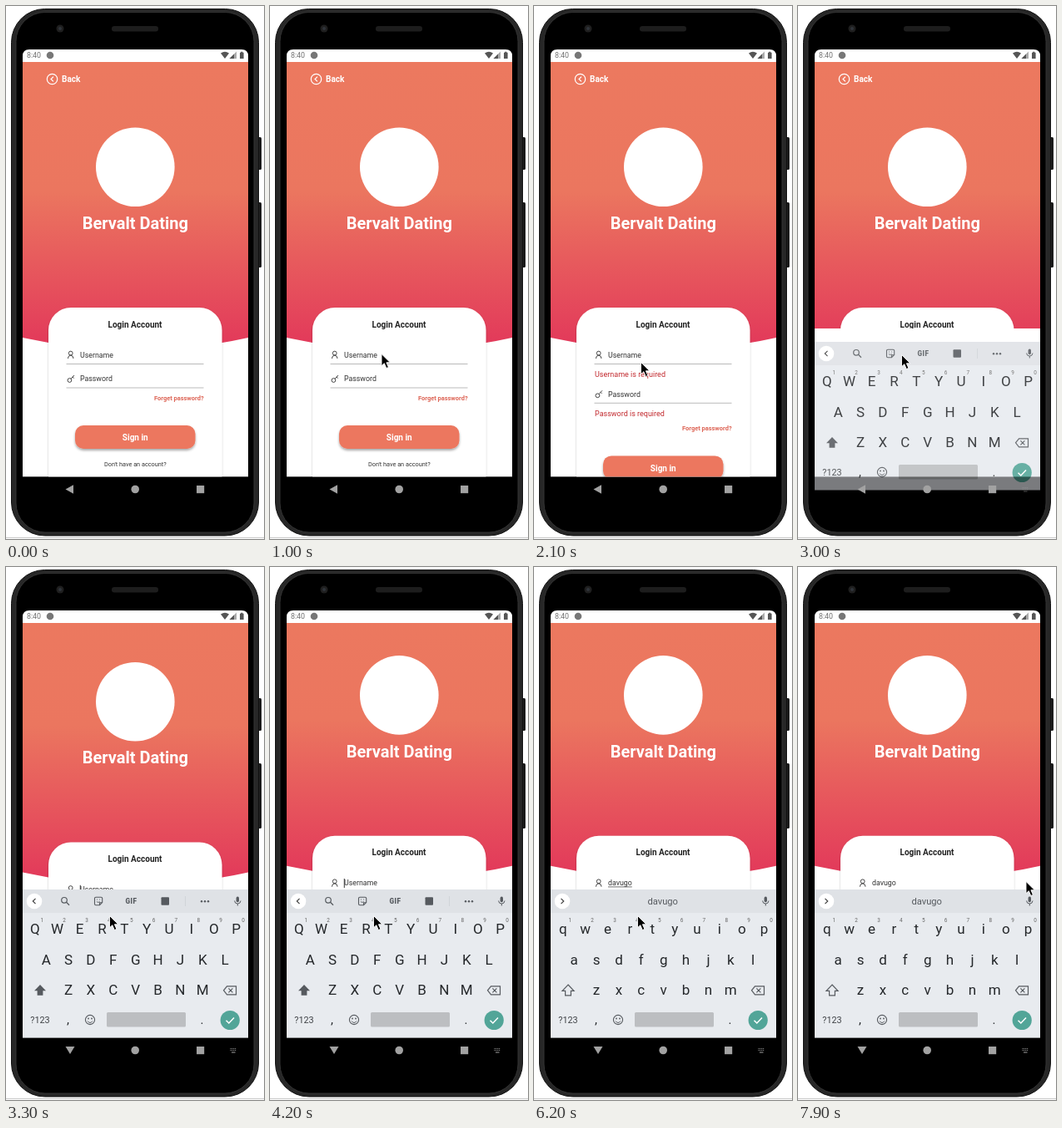
Write an HTML page that moves like this. It is 310 by 638 pixels and loops after 8000 ms.

```html
<!DOCTYPE html>
<html lang="en">
<head>
<meta charset="utf-8">
<title>Login form</title>
<style>
html, body { margin: 0; width: 100%; height: 100%; overflow: hidden; background: #fff; }
svg { display: block; width: 310px; height: 638px; font-family: Roboto, "Noto Sans", sans-serif; user-select: none; }
</style>
</head>
<body>
<svg id="stage" viewBox="0 0 310 638" xmlns="http://www.w3.org/2000/svg"></svg>
<script>
const LOOP = 8000, STEP = 100;
const BRAND = "Bervalt Dating", NAME = "davugo";
const TYPE_START = 4300, TYPE_GAP = 260, COMMIT = 7500;
const CORAL = "#ec775f";

const text = (x, y, s, size, fill = "#333", extra = "") =>
  `<text x="${x}" y="${y}" font-size="${size}" fill="${fill}" ${extra}>${s}</text>`;
const mid = 'text-anchor="middle"', bold = 'font-weight="700"';
const rect = (x, y, w, h, fill, extra = "") =>
  `<rect x="${x}" y="${y}" width="${w}" height="${h}" fill="${fill}" ${extra}/>`;
const circle = (x, y, r, fill, extra = "") =>
  `<circle cx="${x}" cy="${y}" r="${r}" fill="${fill}" ${extra}/>`;
const path = (d, fill, extra = "") => `<path d="${d}" fill="${fill}" ${extra}/>`;
const line = (d, color, width = 1, extra = "") =>
  path(d, "none", `stroke="${color}" stroke-width="${width}" ${extra}`);

function phone() {
  return rect(0, 636, 310, 1, "#c9c9c9") +
    rect(302, 157, 5, 39, "#1b1b1b", 'rx="1.5"') +
    rect(302, 235, 5, 78, "#1b1b1b", 'rx="1.5"') +
    rect(6.5, 3.5, 297, 630.5, "#272727", 'rx="40" stroke="#101010"') +
    rect(12, 7.5, 286, 622.5, "#000", 'rx="35" stroke="#3a3a3a" stroke-width=".8"') +
    rect(127, 24, 56, 6.5, "#1d1d1d", 'rx="3.2"') +
    circle(65, 27, 4.5, "#1f1f1f") + circle(65, 27, 2, "#30343a");
}

function statusBar() {
  return path("M20 67V60Q20 52 28 52H283Q291 52 291 60V67Z", "#fff") +
    text(25, 62.3, "8:40", 8.8, "#6e6e6e") +
    circle(53, 59, 4.3, "#777") +
    path("M258 56.5Q263 53 268 56.5L263 63Z", "#555") +
    path("M277 54.5V63H268.5Z", "#aaa") + path("M274 57.5V63H268.5Z", "#555") +
    path("M281 55.8H282.2V54.8H284.4V55.8H285.6V63H281Z", "#555");
}

function hero() {
  return path("M20 66H291V397Q155.5 427 20 397Z", "url(#sunset)") +
    circle(55.5, 87.5, 6.2, "none", 'stroke="#fff" stroke-width="1.2"') +
    line("M57 84.6L54 87.5L57 90.4", "#fff", 1.2) +
    text(67, 90.8, "Back", 10, "#fff", bold) +
    circle(155.3, 192.7, 47.3, "#fff") +
    text(155.3, 267, BRAND, 20, "#fff", `${mid} ${bold}`);
}

function form() {
  const rule = y => line(`M72.5 ${y}H237.5`, "#a9a9a9", .8);
  return rect(51, 361, 208.5, 300, "#fff", 'rx="27" filter="url(#soft)"') +
    text(155, 384.8, "Login Account", 10, "#222", `${mid} ${bold}`) +
    circle(77.7, 415.6, 2.4, "none", 'stroke="#333" stroke-width=".9"') +
    line("M74.4 422Q74.6 418.2 77.7 418.2Q80.8 418.2 81 422", "#333", .9) +
    `<text id="user" x="89" y="420.8" font-size="8.8" fill="#333"></text>` +
    rect(88.8, 412.3, .9, 11, "#222", 'id="caret"') +
    line("M89 422.2H118", "#333", .7, 'id="mark"') +
    rule(428.5) +
    text(73, 444.3, "Username is required", 9, "#c22a2f", 'class="error"') +
    '<g id="pass">' +
      circle(76.4, 448, 2.4, "none", 'stroke="#333" stroke-width=".9"') +
      line("M78 446.2L82 442M80 444L81.6 445.6", "#333", .9) +
      text(89, 449.3, "Password", 8.8) + rule(457) +
    "</g>" +
    text(73, 491.3, "Password is required", 9, "#c22a2f", 'class="error"') +
    '<g id="tail">' +
      text(237.6, 471.5, "Forget password?", 7.45, "#dd6455", `text-anchor="end" ${bold}`) +
      rect(83, 502, 144.5, 28, CORAL, 'rx="10" filter="url(#drop)"') +
      text(155.3, 520.2, "Sign in", 10, "#fff", `${mid} ${bold}`) +
      text(155.3, 551, "Don't have an account?", 7.3, "#333", mid) +
    "</g>";
}

function navIcons() {
  const gray = "#a2a2a2";
  const dots = [576.6, 578.6].map(y => line(`M269.5 ${y}H277`, gray, 1, 'stroke-dasharray="1 .9"')).join("");
  return path("M71.5 578.5L81 573.3V583.7Z", gray, 'id="back"') +
    path("M71.5 574H82.5L77 583Z", gray, 'id="down"') +
    circle(155.2, 578.5, 4.8, gray) + rect(229, 574, 9.2, 9.2, gray) +
    `<g id="ime">${dots}${line("M271 581H275.5", gray, 1)}</g>`;
}

function letters(upper) {
  const rows = [["qwertyuiop", 34.8, 438.7], ["asdfghjkl", 48.2, 475.6], ["zxcvbnm", 75, 512.2]];
  return rows.map(([keys, x, y]) => [...keys].map((k, i) =>
    text(x + i * 26.87, y, upper ? k.toUpperCase() : k, 17, "#25282b", mid)).join("")).join("");
}

function keyboard() {
  const ink = "#565a5f";
  const shift = "M41 500L48 507.3H44.4V512.8H37.6V507.3H34Z";
  const digits = [..."1234567890"].map((d, i) => text(43.2 + i * 26.87, 425, d, 6.4, "#666", mid)).join("");
  return rect(20, 386, 271, 177.5, "#e8ebef") + rect(20, 386, 271, 28, "#dfe2e6") +
    circle(34, 400, 9.3, "#fff") +
    path("M278.3 394.6Q280 394.6 280 396.4V399.4Q280 401.2 278.3 401.2Q276.6 401.2 276.6 399.4V396.4Q276.6 394.6 278.3 394.6Z", ink) +
    line("M274.6 399.5Q274.8 403 278.3 403Q281.8 403 282 399.5M278.3 403V405.5", ink, 1) +
    '<g id="tools">' +
      line("M35.5 396.8L32.3 400L35.5 403.2", "#444", 1.2) +
      circle(70, 398.8, 3.3, "none", `stroke="${ink}" stroke-width="1.2"`) +
      line("M72.5 401.3L76 404.8", ink, 1.3) +
      line("M106.5 396.5Q106.5 395.2 108 395.2H114.2Q115.7 395.2 115.7 396.5V401.5L112.5 404.8H108Q106.5 404.8 106.5 403.3ZM112.5 404.5V401.7H115.5", ink, 1.1) +
      line("M109 400.5Q110.7 402.6 112.5 400.5M109 398H109.9M112.2 398H113.1", ink, .9) +
      text(150.5, 403.1, "GIF", 8.2, ink, `${mid} font-weight="900" letter-spacing=".5"`) +
      rect(186.5, 395.3, 9.5, 9.5, ink, 'rx="1"') +
      rect(215, 394, .7, 12, "#cbced2") +
      [235, 239, 243].map(x => circle(x, 400.2, 1.2, ink)).join("") +
    "</g>" +
    '<g id="suggest">' +
      line("M32.5 396.8L35.7 400L32.5 403.2", "#444", 1.2) +
      `<text id="word" x="154.7" y="404.3" font-size="11.2" fill="${ink}" ${mid}></text>` +
    "</g>" + digits +
    `<g id="upper">${letters(true)}${path(shift, ink)}</g>` +
    `<g id="lower">${letters(false)}${line(shift, ink, 1.2)}</g>` +
    line("M265.5 501.8H276.5V511.8H265.5L261.5 506.8ZM267.4 504.3L272.4 509.3M272.4 504.3L267.4 509.3", ink, 1.2) +
    text(41, 546, "?123", 10.8, "#3e4145", mid) + text(74.5, 547, ",", 15, "#25282b", mid) +
    circle(101, 542, 5.6, "none", `stroke="${ink}" stroke-width="1.1"`) +
    circle(99, 540.5, .9, ink) + circle(103, 540.5, .9, ink) +
    line("M98 543.5Q101 547.5 104 543.5", ink, 1) +
    rect(121, 533, 95, 17.5, "#bcbec1", 'rx="1.5"') + text(235.5, 547, ".", 15, "#25282b", mid) +
    circle(269.2, 542.5, 11.6, "#52a598") +
    line("M264.5 542.8L267.8 546L274 539.4", "#fff", 1.5);
}

document.getElementById("stage").innerHTML = `
<defs>
  <linearGradient id="sunset" gradientUnits="userSpaceOnUse" x1="0" y1="66" x2="0" y2="412">
    <stop offset="0" stop-color="#ec795f"/><stop offset=".45" stop-color="#eb765f"/>
    <stop offset="1" stop-color="#e2375a"/>
  </linearGradient>
  <filter id="soft" x="-10%" y="-10%" width="120%" height="120%">
    <feDropShadow dx="0" dy="1" stdDeviation="1.3" flood-opacity=".25"/></filter>
  <filter id="drop" x="-10%" y="-30%" width="120%" height="180%">
    <feDropShadow dx="0" dy="2" stdDeviation="1.6" flood-opacity=".35"/></filter>
  <clipPath id="view"><rect id="window" x="20" y="66" width="271" height="497.5"/></clipPath>
</defs>
${phone()}
${rect(20, 66, 271, 497.5, "#fff")}
<g clip-path="url(#view)"><g id="page">${hero()}${form()}</g></g>
${statusBar()}
<g id="keys">${keyboard()}</g>
${rect(20, 563.5, 271, 32, "#000", 'opacity=".4"')}
${navIcons()}
${path("M0 0V14.2L3.3 11.2L5.8 17L8.4 15.9L5.9 10.3H10.4Z", "#000", 'id="cursor" stroke="#fff" stroke-width=".9"')}`;

const el = {};
document.querySelectorAll("#stage [id]").forEach(n => el[n.id] = n);
const errors = document.querySelectorAll(".error");
const show = (node, on) => node.setAttribute("display", on ? "inline" : "none");
const move = (node, x, y) => node.setAttribute("transform", `translate(${x} ${y})`);
const progress = (t, a, b) => Math.min(1, Math.max(0, (t - a) / (b - a)));
const ease = p => p * p * (3 - 2 * p);

// time, x, y
const trail = [
  [400, 150, 500], [900, 134, 416.5], [1200, 134, 416.5], [1600, 128.5, 426.5], [2200, 128.5, 426.5],
  [2700, 124.5, 417.5], [6800, 124.5, 417.5], [7300, 276, 384], [7900, 274, 376.5]
];

function cursorAt(t) {
  let i = 0;
  while (i < trail.length - 2 && t >= trail[i + 1][0]) i++;
  const [a, x0, y0] = trail[i], [b, x1, y1] = trail[i + 1];
  const p = ease(progress(t, a, b));
  return [x0 + (x1 - x0) * p, y0 + (y1 - y0) * p];
}

function draw(t) {
  const invalid = t >= 1500;
  errors.forEach(e => show(e, invalid));
  move(el.pass, 0, invalid ? 18.3 : 0);
  move(el.tail, 0, invalid ? 36.4 : 0);

  const rise = progress(t, 2800, 3200);
  show(el.keys, rise > 0);
  move(el.keys, 0, 32 * (1 - rise));
  el.keys.setAttribute("opacity", Math.min(1, rise * 1.75));
  el.ime.setAttribute("opacity", rise);
  el.window.setAttribute("height", rise > 0 ? 320 : 497.5);
  show(el.back, rise < 1);
  show(el.down, rise === 1);
  move(el.page, 0, -39.3 * ease(progress(t, 3050, 3400)));

  const count = Math.max(0, Math.min(NAME.length, Math.floor((t - TYPE_START) / TYPE_GAP) + 1));
  const typed = NAME.slice(0, count);
  el.user.textContent = typed || "Username";
  el.word.textContent = typed;
  show(el.upper, !count);
  show(el.tools, !count);
  show(el.lower, count);
  show(el.suggest, count);

  const width = count ? el.user.getComputedTextLength() : 0;
  const since = count ? t - TYPE_START - (count - 1) * TYPE_GAP : t - 3100;
  show(el.caret, t >= 3100 && t < COMMIT && since % 1000 < 500);
  move(el.caret, width, 0);
  show(el.mark, count && t < COMMIT);
  el.mark.setAttribute("d", `M89 422.2h${width}`);

  show(el.cursor, t >= trail[0][0]);
  move(el.cursor, ...cursorAt(t));
}

const start = performance.now();
function tick() {
  const t = (performance.now() - start) % LOOP;
  draw(Math.floor(t / STEP) * STEP);
  requestAnimationFrame(tick);
}
tick();
</script>
</body>
</html>
```
